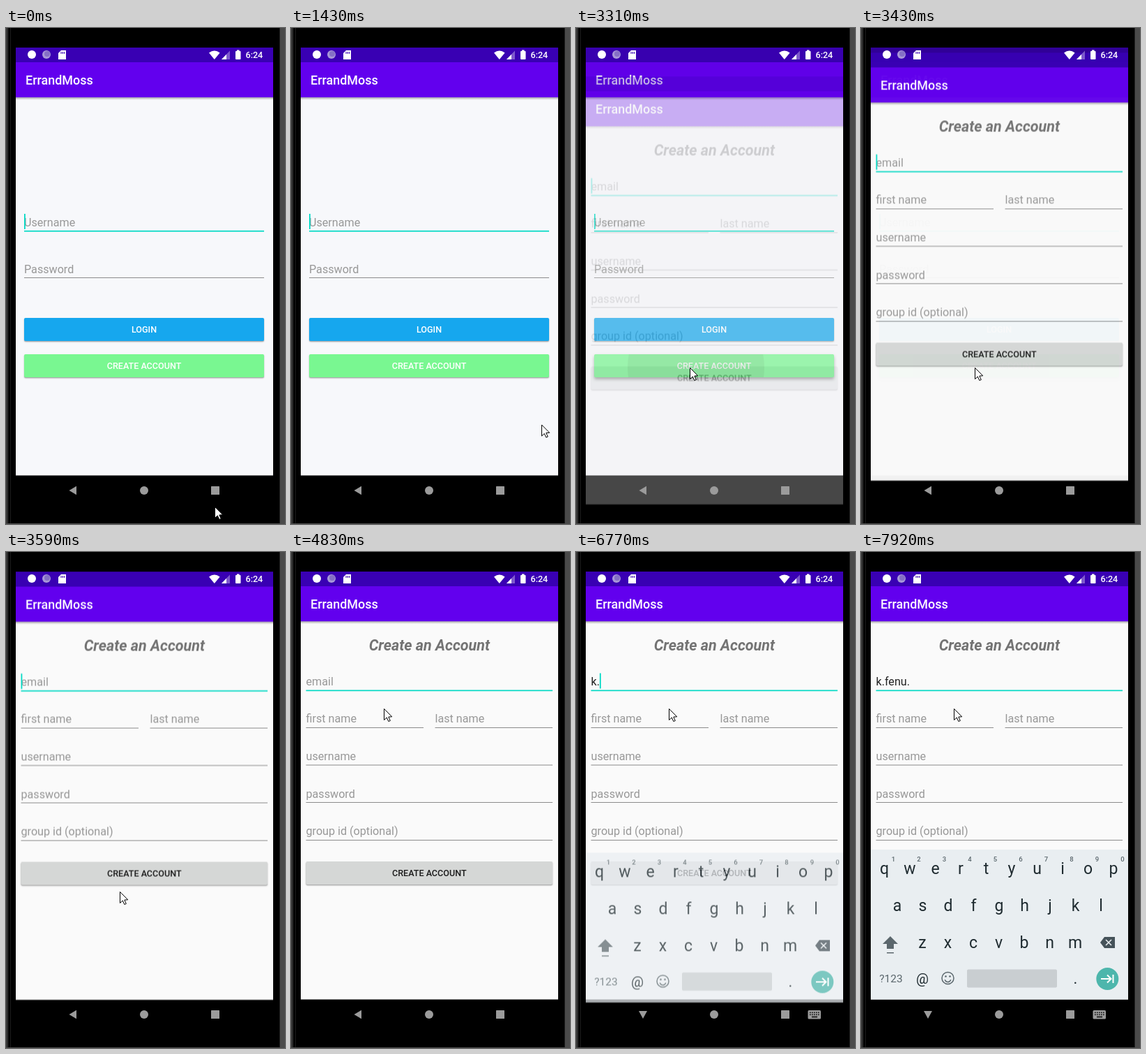
Recreate the animation shown at these times as an HTML page with a canvas. Size 400 by 710 pixels, loop 8 s.

```html
<!DOCTYPE html>
<html lang="en">
<head>
<meta charset="utf-8">
<title>Create an Account</title>
<style>
html, body { margin: 0; width: 100%; height: 100%; overflow: hidden; background: #000; }
canvas { display: block; width: 400px; height: 710px; }
</style>
</head>
<body>
<canvas id="stage" width="400" height="710"></canvas>
<script>
const LOOP = 8000, W = 400, H = 710;
const APP = 'ErrandMoss', EMAIL = 'k.fenu.';
const FONT = 'Roboto, "Noto Sans", sans-serif';
const TEAL = '#03dac5', LINE = '#8c8c8c', HINT = '#989898';
const SCREEN = { x: 14, y: 28, w: 369, h: 655 };
const NAV_TOP = 640.5;
const KEY_TIMES = [6590, 6740, 6870, 6970, 7070, 7250, 7430];
const CARET_FLIPS = [3840, 4260, 4830, 5350, 5780, 6280, 7920];
const POINTER = [
  [0, 299, 685], [110, 299, 685], [450, 304, 712], [451, 460, 720],
  [1319, 460, 590], [1320, 384, 578], [1830, 178, 492], [2020, 178, 492],
  [2480, 162, 480], [2780, 163, 486], [4020, 163, 486], [4260, 133, 224]
];

const stage = document.getElementById('stage').getContext('2d');
const layer = document.createElement('canvas');
layer.width = W;
layer.height = H;
const layerCtx = layer.getContext('2d');
let c = stage;

const clamp = v => Math.max(0, Math.min(1, v));
const decel = (u, power) => 1 - Math.pow(1 - clamp(u), power);

function rect(x, y, w, h, fill) {
  c.fillStyle = fill;
  c.fillRect(x, y, w, h);
}

function round(x, y, w, h, r, fill) {
  c.fillStyle = fill;
  c.beginPath();
  c.roundRect(x, y, w, h, r);
  c.fill();
}

function disc(x, y, r, fill) {
  c.fillStyle = fill;
  c.beginPath();
  c.arc(x, y, r, 0, Math.PI * 2);
  c.fill();
}

function poly(points, fill, stroke) {
  c.beginPath();
  for (let i = 0; i < points.length; i += 2) c.lineTo(points[i], points[i + 1]);
  c.closePath();
  if (fill) { c.fillStyle = fill; c.fill(); }
  if (stroke) { c.strokeStyle = stroke; c.lineWidth = 1; c.stroke(); }
}

function lines(points, width, color) {
  c.strokeStyle = color;
  c.lineWidth = width;
  c.beginPath();
  for (let i = 0; i < points.length; i += 2) c.lineTo(points[i], points[i + 1]);
  c.stroke();
}

function text(str, x, y, size, color, style = '400', align = 'left') {
  c.font = `${style} ${size}px ${FONT}`;
  c.textAlign = align;
  c.fillStyle = color;
  c.fillText(str, x, y);
  return c.measureText(str).width;
}

function field(hint, x, right, base, line, active) {
  if (hint) text(hint, x, base, 16.15, HINT);
  if (active) rect(x, line - 0.5, right - x, 1.7, TEAL);
  else rect(x, line, right - x, 1, LINE);
}

function button(label, x, y, w, fill, color, lift = 0) {
  c.save();
  c.shadowColor = 'rgba(0,0,0,.36)';
  c.shadowBlur = 1.6 + lift * 3;
  c.shadowOffsetY = 1.2 + lift * 1.5;
  round(x, y, w, 33, 2, fill);
  c.restore();
  text(label, x + w / 2, y + 21, 12.57, color, '500', 'center');
}

function appFrame(bg) {
  const s = SCREEN;
  rect(s.x, s.y, s.w, s.h, '#000');
  rect(s.x, s.y, s.w, NAV_TOP - s.y, bg);
  const shade = c.createLinearGradient(0, 99, 0, 103);
  shade.addColorStop(0, 'rgba(0,0,0,.34)');
  shade.addColorStop(1, 'rgba(0,0,0,0)');
  rect(s.x, 99, s.w, 4, shade);
  rect(s.x, 49, s.w, 50.2, '#6200ee');
  rect(s.x, s.y, s.w, 21, '#3900b3');
  text(APP, 28, 81, 17.95, '#fff', '500');
}

function loginScreen(t) {
  appFrame('#f7f8fb');
  field('Username', 26, 370, 283.5, 290.4, true);
  field('Password', 26, 370, 350.5, 357);
  const on = Math.floor(Math.max(0, t - 70) / 500) % 2 === 0;
  if (on) rect(26, 266, 1.8, 22, TEAL);
  button('LOGIN', 26, 415, 344, '#16a7ee', '#fff');
  const press = decel((t - 2840) / 240, 2);
  button('CREATE ACCOUNT', 26, 467, 344, '#79f791', '#fff', press);
  if (press > 0) {
    c.save();
    c.beginPath();
    c.roundRect(26, 467, 344, 33, 2);
    c.clip();
    disc(172, 486, 98 * press, 'rgba(0,0,0,.07)');
    c.restore();
  }
}

function accountScreen(t) {
  appFrame('#fafafa');
  text('Create an Account', 198.3, 140.5, 21.5, '#737373', 'italic 700', 'center');
  const typed = EMAIL.slice(0, KEY_TIMES.filter(k => t >= k).length);
  field(typed ? '' : 'email', 21.5, 375, 190.7, 198, true);
  const width = typed ? text(typed, 21.5, 190.7, 16.15, '#222') : 0;
  if (CARET_FLIPS.filter(k => t >= k).length % 2 === 0) {
    rect(21.5 + width, 173.5, 1.8, 22, TEAL);
  }
  field('first name', 21.5, 190, 244.4, 251);
  field('last name', 206.5, 375, 244.4, 251);
  field('username', 21.5, 375, 298, 304.5);
  field('password', 21.5, 375, 351.7, 358);
  field('group id (optional)', 21.5, 375, 405.3, 412);
  button('CREATE ACCOUNT', 21.5, 443, 353.5, '#d5d7d6', '#1c1c1c');
}

function keyRow(keys, x, y) {
  [...keys].forEach((key, i) => text(key, x + i * 36.5, y, 23, '#1f2b30', '400', 'center'));
}

function keyboard() {
  const gray = '#5b676d';
  rect(SCREEN.x, 426, SCREEN.w, NAV_TOP - 426, '#e9eef1');
  keyRow('qwertyuiop', 33.5, 461);
  [...'1234567890'].forEach((n, i) =>
    text(n, 46.5 + i * 36.5, 443, 9.5, gray, '500', 'center'));
  keyRow('asdfghjkl', 52, 514);
  keyRow('zxcvbnm', 88, 566.5);

  poly([42, 550, 53, 561, 47, 561, 47, 568, 37, 568, 37, 561, 31, 561], gray);
  rect(37, 573, 10, 1.5, gray);
  poly([343, 559, 349, 551, 364, 551, 364, 567, 349, 567], '#455259');
  lines([351, 555, 359, 563], 1.6, '#e9eef1');
  lines([359, 555, 351, 563], 1.6, '#e9eef1');

  text('?123', 43, 616, 15.5, gray, '400', 'center');
  text('@', 88, 618, 20, '#1f2b30', '400', 'center');
  c.strokeStyle = gray;
  c.lineWidth = 1.5;
  c.beginPath();
  c.arc(124.5, 610, 8.5, 0, Math.PI * 2);
  c.stroke();
  c.beginPath();
  c.arc(124.5, 611, 4.5, 0.3, Math.PI - 0.3);
  c.stroke();
  disc(121.5, 607.5, 1.3, gray);
  disc(127.5, 607.5, 1.3, gray);
  round(152, 597.5, 129, 26, 2, '#c9ced1');
  text('.', 307.5, 618, 22, '#1f2b30', '400', 'center');
  disc(353.3, 611, 16, '#4db6ac');
  lines([344, 611, 358, 611], 2, '#fff');
  lines([353, 605.5, 358.5, 611, 353, 616.5], 2, '#fff');
  lines([361.5, 605, 361.5, 617], 2, '#fff');
}

function statusIcons() {
  disc(37, 38, 6, '#fff');
  disc(58, 38, 6, '#a898d8');
  disc(59, 37, 4, '#8570c6');
  poly([79, 32, 86, 32, 86, 45, 75, 45, 75, 36], '#fff');
  for (let i = 0; i < 3; i++) rect(78.5 + i * 2.3, 34, 1.1, 3, '#3900b3');

  c.fillStyle = '#fff';
  c.beginPath();
  c.moveTo(298.8, 45);
  c.lineTo(291, 35.5);
  c.quadraticCurveTo(298.8, 29.5, 306.6, 35.5);
  c.fill();
  poly([321, 32.5, 321, 45, 309, 45], 'rgba(255,255,255,.35)');
  poly([316, 37.7, 316, 45, 309, 45], '#fff');
  rect(331, 31.5, 3.5, 2, '#fff');
  round(329, 33, 7.5, 12, 1, '#fff');
  text('6:24', 343.5, 43.3, 12.57, '#fff', '500');
}

function navIcons(open) {
  const gray = '#9b9b9b';
  if (open) {
    poly([90, 657, 102, 657, 96, 668], gray);
    round(332.5, 656, 18.5, 12.5, 1.5, gray);
    for (let row = 0; row < 2; row++) {
      for (let i = 0; i < 5; i++) rect(335 + i * 3, 658.5 + row * 3, 1.6, 1.6, '#111');
    }
    rect(338, 664.7, 8, 1.6, '#111');
  } else {
    poly([90.5, 662, 101, 655.7, 101, 668.3], gray);
  }
  disc(198, 662, 6, gray);
  round(294, 656, 12, 12, 0.5, gray);
}

function bezel() {
  rect(0, 0, W, H, '#000');
  rect(0, 0, 2, H, '#383838');
  rect(2, 0, 1.5, H, '#222');
  rect(6, 0, 1, H, '#1b1b1b');
  rect(392, 0, 1, H, '#262626');
  rect(393, 0, 7, H, '#4a4a4a');
  rect(0, 709, W, 1, '#4a4a4a');
}

function pointer(t) {
  let i = POINTER.length - 1;
  while (POINTER[i][0] > t) i--;
  const a = POINTER[i], b = POINTER[i + 1] || a;
  const u = b === a ? 0 : (t - a[0]) / (b[0] - a[0]);
  const e = u * u * (3 - 2 * u);
  c.save();
  c.translate(a[1] + (b[1] - a[1]) * e + 0.5, a[2] + (b[2] - a[2]) * e + 0.5);
  poly([0, 0, 0, 16, 3.8, 12.5, 6.3, 18, 8.8, 17, 6.3, 11.6, 11.2, 11.3], '#fff', '#000');
  c.restore();
}

// Paints a window as one group so it can fade as a whole.
function overlay(paint, dy, alpha) {
  c = layerCtx;
  c.clearRect(0, 0, W, H);
  paint();
  c = stage;
  c.save();
  c.beginPath();
  c.rect(SCREEN.x, SCREEN.y, SCREEN.w, SCREEN.h);
  c.clip();
  c.globalAlpha = alpha;
  c.drawImage(layer, 0, dy);
  c.restore();
}

// The old window dims to 70% while the new one fades and slides in.
function openAccount(t) {
  const age = 16 + Math.floor((t - 3310) / 60) * 60 * 0.81;
  const dim = 0.3 * clamp(age / 217);
  rect(SCREEN.x, SCREEN.y, SCREEN.w, SCREEN.h, `rgba(0,0,0,${dim})`);
  overlay(() => accountScreen(t), 52.4 * (1 - decel(age / 350, 5)), decel(age / 200, 4));
}

function draw(t) {
  c = stage;
  bezel();
  if (t < 3600) {
    loginScreen(t);
    if (t >= 3310) openAccount(t);
  } else {
    accountScreen(t);
  }
  if (t >= 6650) {
    const age = t - 6640;
    overlay(keyboard, 46 * (1 - decel(age / 350, 5)), clamp(age / 180));
  }
  statusIcons();
  navIcons(t >= 6590);
  pointer(t);
}

const start = performance.now();
function tick() {
  draw((performance.now() - start) % LOOP);
  requestAnimationFrame(tick);
}
tick();
</script>
</body>
</html>
```
